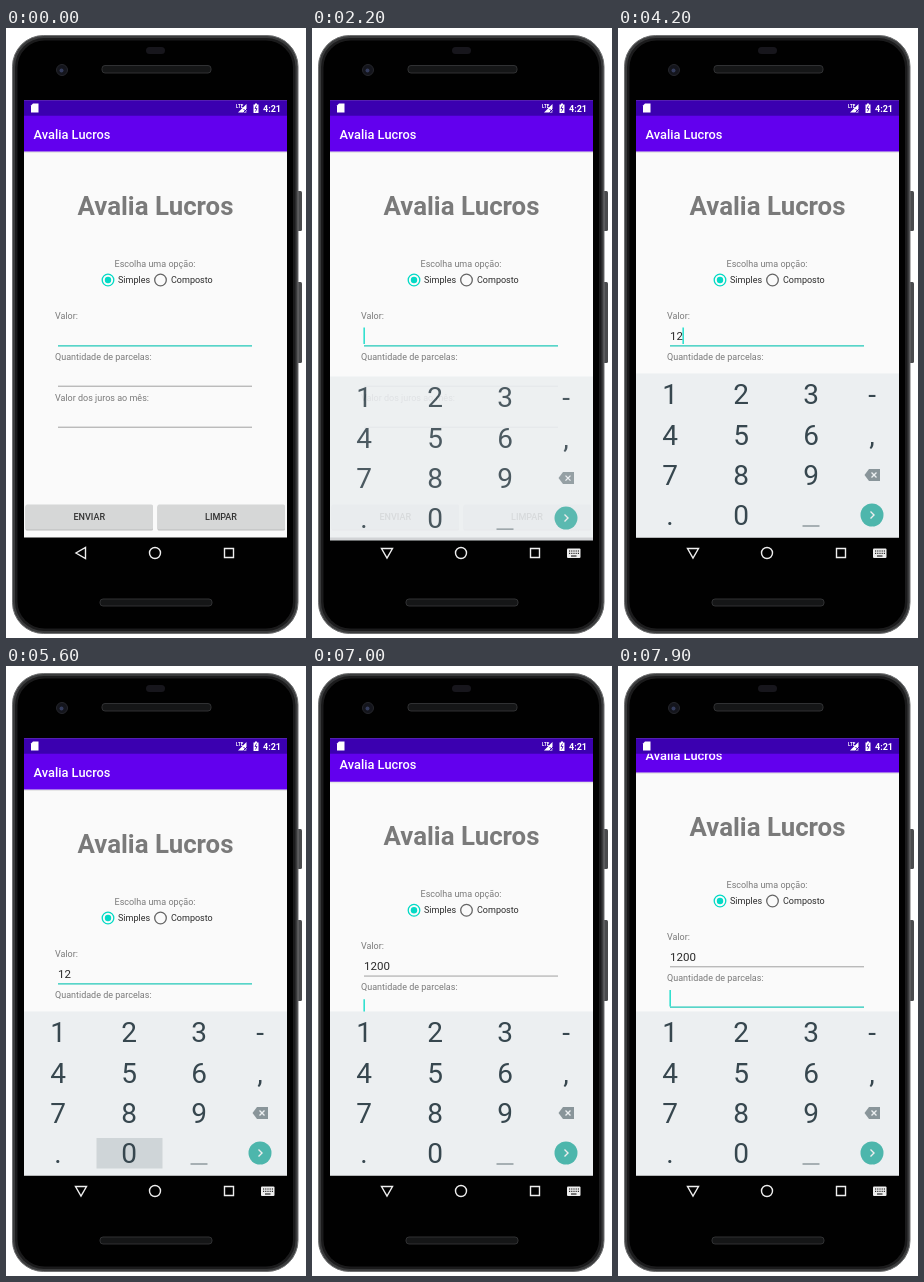
An HTML page for the animation above (8000 ms loop, 300 by 610 pixels).

```html
<!DOCTYPE html>
<html lang="pt">
<head>
<meta charset="utf-8">
<style>
  html, body { margin: 0; width: 100%; height: 100%; overflow: hidden; background: #fff; }
  svg { display: block; width: 300px; height: 610px; font: 9px Roboto, Arial, sans-serif; }
  .mid { text-anchor: middle; }
  .label { fill: #7a7a7a; }
  .dark { fill: #2a2a2a; }
  .btn { font-weight: 500; fill: #333; }
  .line { fill: none; stroke: #eee; stroke-width: 1.4; }
  #digits { font-size: 28px; fill: #37474f; }
</style>
</head>
<body>
<svg viewBox="0 0 300 610">
  <defs>
    <clipPath id="screen"><path d="M18 72.500h263v437H18z"/></clipPath>
    <clipPath id="panel"><path d="M18 300h263v240H18z"/></clipPath>
  </defs>

  <!-- phone body -->
  <g fill="#4a4b4d">
    <rect x="290" y="163" width="6" height="40" rx="1.500"/>
    <rect x="290" y="254" width="6" height="81" rx="1.500"/>
  </g>
  <rect x="6.500" y="7.500" width="285.500" height="598" rx="31" fill="#3a3b3c" stroke="#707172"/>
  <rect x="9" y="10" width="280.500" height="593" rx="29" fill="#1b1b1c"/>
  <rect x="11.500" y="12.500" width="275.500" height="588" rx="27" fill="#010101"/>
  <rect x="140" y="19" width="19" height="7" rx="3.500" fill="#17161c"/>
  <circle cx="56" cy="42" r="5.500" fill="#14151c" stroke="#25262b"/>
  <circle cx="55.500" cy="42.500" r="2" fill="#343c5c"/>
  <g fill="#151617" stroke="#303133">
    <rect x="96" y="37.500" width="109" height="7.500" rx="3"/>
    <rect x="94" y="571" width="112" height="7" rx="3"/>
  </g>

  <!-- app -->
  <g clip-path="url(#screen)">
    <path d="M18 72h263v438H18z" fill="#fafafa"/>
    <g id="page">
      <path d="M18 70h263v53.500H18z" fill="#6200ee"/>
      <path d="M18 123.500h263v1.500H18z" fill="#000" opacity=".08"/>
      <text x="27.500" y="111" font-size="12.800" font-weight="500" fill="#fff">Avalia Lucros</text>
      <text x="149.500" y="186.500" font-size="25.800" font-weight="700" class="mid label">Avalia Lucros</text>
      <text x="149" y="239" class="mid label">Escolha uma opção:</text>
      <g fill="none" stroke-width="1.300">
        <circle cx="102" cy="252" r="5.800" stroke="#03dac5"/>
        <circle cx="154.500" cy="252" r="5.800" stroke="#666"/>
      </g>
      <circle cx="102" cy="252" r="3.200" fill="#03dac5"/>
      <text x="112" y="255" class="dark">Simples</text>
      <text x="165" y="255" class="dark">Composto</text>
      <text x="49" y="291" class="label">Valor:</text>
      <text x="49" y="332" class="label">Quantidade de parcelas:</text>
      <text x="49" y="373" class="label">Valor dos juros ao mês:</text>
      <path id="field1" d="M52 317.800h194"/>
      <path id="field2" d="M52 358.200h194"/>
      <path d="M52 399.200h194" stroke="#a0a0a0"/>
      <text id="value" x="52" y="312" font-size="11.500" class="dark"></text>
      <rect id="cursor" width="1.300" height="16.500" fill="#03dac5"/>
      <g fill="#bbb"><rect x="19.500" y="477.500" width="127.500" height="25" rx="1.500"/><rect x="151.500" y="477.500" width="127.500" height="25" rx="1.500"/></g>
      <g fill="#d6d7d7"><rect x="19.500" y="476.500" width="127.500" height="25" rx="1.500"/><rect x="151.500" y="476.500" width="127.500" height="25" rx="1.500"/></g>
      <text x="83.300" y="491.700" class="mid btn">ENVIAR</text>
      <text x="215" y="491.700" class="mid btn">LIMPAR</text>
    </g>

    <!-- status bar -->
    <path d="M18 72h263v15.700H18z" fill="#3b00b0"/>
    <g fill="#fff">
      <path d="M27 75.500h5.500v9H25v-7z"/>
      <path d="M240.500 76v8.500H232z"/>
      <text x="230" y="79.500" font-size="4.500" font-weight="700">LTE</text>
      <path d="M247.500 76.500h1.500v-1h2v1h1.500v8.500h-5z"/>
      <text x="275" y="83.500" font-size="9" font-weight="700" text-anchor="end">4:21</text>
    </g>
    <path d="M237.500 81l3.500 3.500m0-3.500l-3.500 3.500" stroke="#3b00b0"/>
    <path d="M250.500 77.500l-1.500 3h2l-1.500 3" fill="none" stroke="#3b00b0" stroke-width=".8"/>
  </g>

  <!-- keyboard -->
  <g clip-path="url(#panel)">
    <g id="keys">
      <path d="M18 345.500h263v164H18z" fill="#eceff1"/>
      <rect id="press" width="66" height="30.500" fill="#cfd5d8"/>
      <g id="digits" class="mid"></g>
      <path d="M184.500 498h17" stroke="#78858b" stroke-width="1.200"/>
      <path d="M246.500 447l4.500-6h11v12h-11z" fill="#89959a"/>
      <path d="M253.500 444.500l5 5m0-5l-5 5" stroke="#eceff1" stroke-width="1.300"/>
      <circle id="enter" cx="254" cy="487" r="11.500"/>
      <path d="M252.500 483.500l3.500 3.500-3.500 3.500" class="line"/>
    </g>
  </g>

  <!-- navigation bar -->
  <path id="back" class="line"/>
  <circle cx="149" cy="525" r="5.500" class="line"/>
  <path d="M218.500 520.500h9v9h-9z" class="line"/>
  <g id="imeIcon">
    <rect x="255" y="520.500" width="13.500" height="9.500" rx="1" fill="#eee"/>
    <path d="M257 523h10m-10 2.300h10" stroke="#000" stroke-dasharray="1.200 1"/>
    <path d="M259 528h5.500" stroke="#000"/>
  </g>
</svg>
<script>
const $ = id => document.getElementById(id);
const set = (id, attrs) => { for (const k in attrs) $(id).setAttribute(k, attrs[k]); };
const show = (id, on) => set(id, { visibility: on ? 'visible' : 'hidden' });

const cols = [52, 123, 193, 254], rows = [366, 407, 447, 487];
['123-', '456,', '789', '.0'].forEach((row, r) => [...row].forEach((key, c) => {
  $('digits').innerHTML += `<text x="${cols[c]}" y="${rows[r] + 10}">${key}</text>`;
}));

const blinks = [300, 800, 1300, 1600, 2100, 2600, 3100, 3600, 4100, 4700, 5100,
  5600, 5700, 6300, 6800, 7400, 7900];
const typed = [3200, 4200, 5700, 5900];
// start, end, column, row
const presses = [[3100, 3200, 0, 0], [4100, 4200, 1, 0], [5600, 5900, 1, 3]];
const passed = (times, t) => times.filter(x => x <= t).length;
const progress = (t, from, to) => Math.min(1, Math.max(0, (t - from) / (to - from)));

function field(id, focused) {
  set(id, { stroke: focused ? '#20c8b8' : '#a0a0a0', 'stroke-width': focused ? 1.3 : 1 });
}

function draw(now) {
  const t = Math.floor(now % 8000 / 100) * 100;
  const second = t >= 6900;
  const count = passed(typed, t);

  // the page pans up and decelerates
  const pan = 1 - (1 - progress(t, 6900, 7200)) ** 1.5;
  set('page', { transform: `translate(0 ${-17 * pan})` });
  field('field1', !second);
  field('field2', second);
  $('value').textContent = '1200'.slice(0, count);
  set('cursor', { x: 51.5 + (second ? 0 : count * 6.5), y: second ? 341 : 299.5 });
  show('cursor', passed(blinks, t) % 2);

  const left = (1 - progress(t, 2000, 2300)) ** 2;
  set('keys', { transform: `translate(0 ${28 * left})`, opacity: 1 - left });
  const hit = presses.find(p => t >= p[0] && t < p[1]);
  show('press', hit);
  if (hit) set('press', { x: cols[hit[2]] - 32.5, y: rows[hit[3]] - 15 });
  set('enter', { fill: t === 6800 ? '#3d958d' : '#4db6ac' });

  const open = t >= 1900;
  set('back', { d: open ? 'M69.500 520.500h11l-5.500 9.500z' : 'M79.500 519.500v11l-9.500-5.500z' });
  show('imeIcon', open);
}

const start = performance.now();
function tick() {
  draw(performance.now() - start);
  requestAnimationFrame(tick);
}
tick();
</script>
</body>
</html>
```
